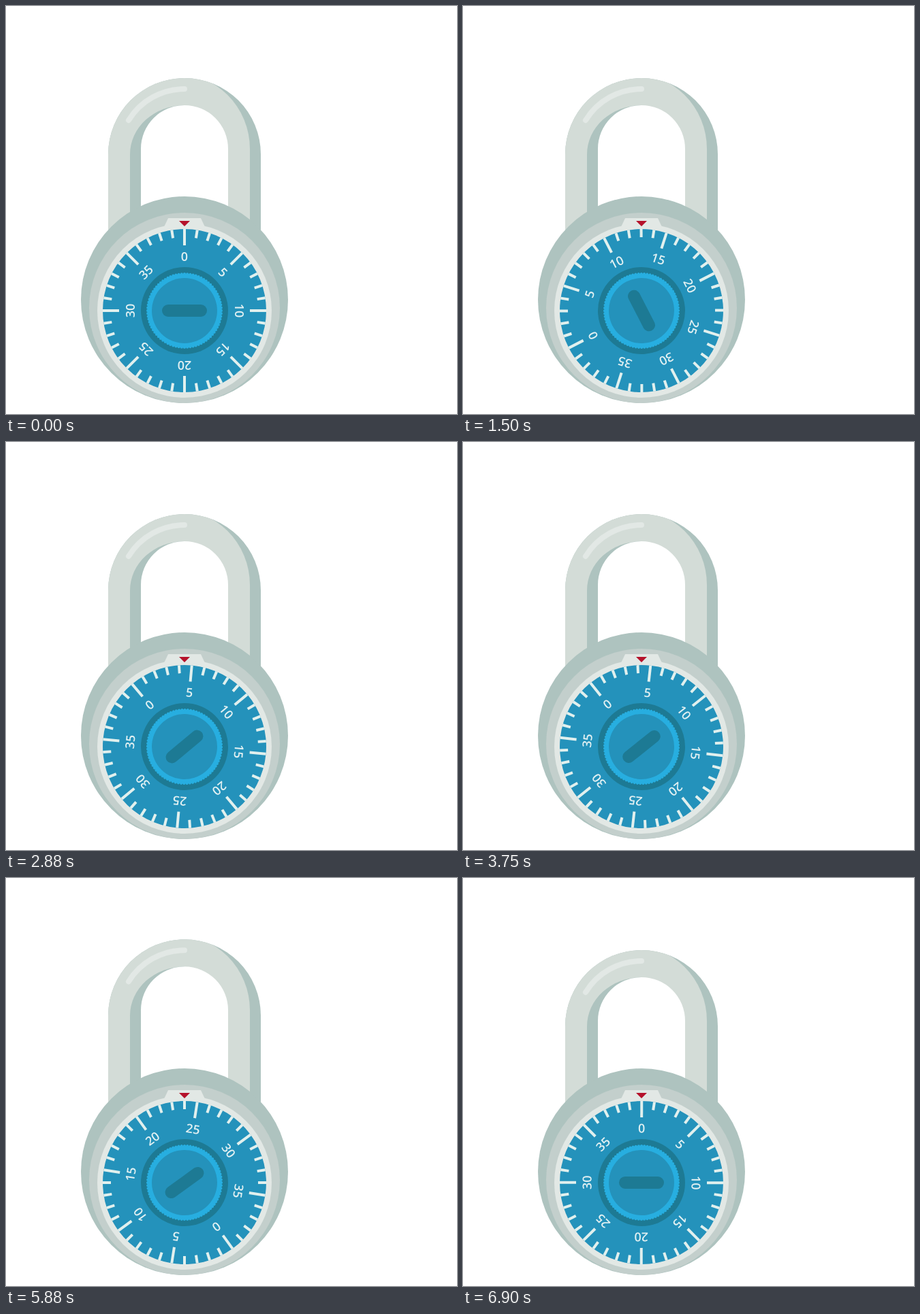
Write an HTML page that moves like this. It is 662x600 px and loops after 7.2 s.

```html
<!DOCTYPE html>
<html lang="en">
<head>
<meta charset="utf-8">
<title>Combination lock</title>
<style>
  html, body { margin: 0; width: 100%; height: 100%; overflow: hidden; background: #fff; }
  svg { display: block; }
  text {
    font: 600 18px "Open Sans", "Noto Sans", sans-serif;
    font-stretch: 75%;
    text-anchor: middle;
    fill: #e1f0f2;
  }
</style>
</head>
<body>
<svg width="662" height="600" viewBox="0 0 662 600">
  <defs>
    <clipPath id="front"><path d="M134 450V210A112 112 0 0 1 358 210V450Z"/></clipPath>
  </defs>

  <g id="shackle">
    <path d="M150 420V218A112 112 0 0 1 374 218V420Z" fill="#aec3bf"/>
    <path d="M150 420V218A112 112 0 0 1 374 218V420Z" fill="#d3dcd7" clip-path="url(#front)"/>
    <path d="M182 420V218A80 72 0 0 1 262 146V420Z" fill="#aec3bf"/>
    <path d="M198 420V210A64 64 0 0 1 326 210V420Z" fill="#fff"/>
    <path d="M180 168A96 96 0 0 1 262 122" fill="none" stroke="#e2e8e5" stroke-width="8" stroke-linecap="round"/>
  </g>

  <circle cx="262" cy="432" r="152" fill="#aec3bf"/>
  <circle cx="262" cy="444" r="140" fill="#c3cfcc"/>
  <circle cx="262" cy="448" r="128" fill="#e2e8e5"/>
  <path d="M238 312H286L293 327H231Z" fill="#e2e8e5"/>
  <path d="M254 316H270L262 324Z" fill="#b5122b"/>

  <g id="dial">
    <circle r="120" fill="#2492bb"/>
    <g id="marks" stroke="#e1f0ee" stroke-width="4"></g>
    <g id="numbers"></g>
    <circle r="64" fill="#1d7a94"/>
    <circle r="54.5" fill="#27aee0"/>
    <circle r="54" fill="none" stroke="#27aee0" stroke-width="4" stroke-linecap="round"
            pathLength="80" stroke-dasharray="0 1"/>
    <circle r="48" fill="#2492bb"/>
    <rect x="-33" y="-9" width="66" height="18" rx="9" fill="#1d7a94"/>
  </g>
</svg>
<script>
const LOOP = 7200;
const SVG_NS = "http://www.w3.org/2000/svg";
const byId = id => document.getElementById(id);
const dial = byId("dial");
const shackle = byId("shackle");

// Each move: start ms, end ms, from, to.
const turns = [
  [58, 1793, 0, 639],
  [1941, 3246, 639, 261],
  [3387, 4420, 261, 504],
  [6110, 6910, 504, 0]
];
const lifts = [
  [4400, 5140, 0, 80],
  [5380, 6110, 80, 0]
];

function add(parent, name, attributes) {
  const node = document.createElementNS(SVG_NS, name);
  for (const key in attributes) node.setAttribute(key, attributes[key]);
  return parent.appendChild(node);
}

function buildDial() {
  for (let n = 0; n < 40; n++) {
    const transform = `rotate(${n * 9})`;
    const major = n % 5 === 0;
    add(byId("marks"), "path", { d: `M0 -120V${major ? -96 : -108}`, transform });
    if (major) add(byId("numbers"), "text", { y: -73.5, transform }).textContent = n;
  }
}

const easeInOut = t => t < 0.5 ? 2 * t * t : 1 - 2 * (1 - t) ** 2;

function valueAt(moves, time) {
  let value = moves[0][2];
  for (const [start, end, from, to] of moves) {
    if (time < start) break;
    value = from + (to - from) * easeInOut(Math.min(1, (time - start) / (end - start)));
  }
  return value;
}

function render(time) {
  dial.setAttribute("transform", `translate(262 448) rotate(${valueAt(turns, time)})`);
  shackle.setAttribute("transform", `translate(0 ${-valueAt(lifts, time)})`);
}

buildDial();
render(0);
const startTime = performance.now();
function tick() {
  render((performance.now() - startTime) % LOOP);
  requestAnimationFrame(tick);
}
requestAnimationFrame(tick);
</script>
</body>
</html>
```
